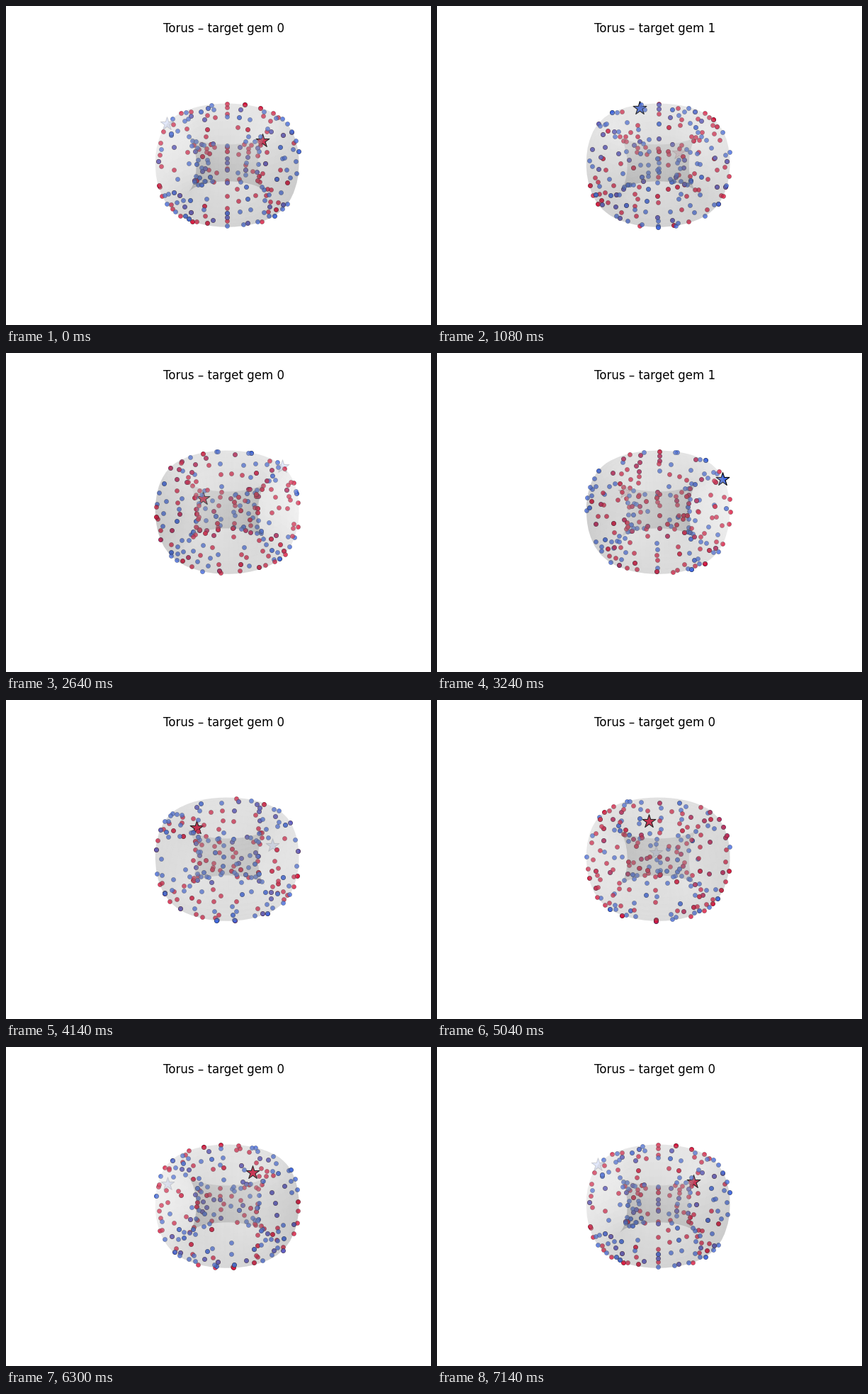
Animation of 600x450 px, one loop 7.2 s. Source, as a matplotlib script:

```python
import numpy as np
import matplotlib.pyplot as plt
from matplotlib.animation import FuncAnimation

FRAMES = 120
LATTICE = 20
MAJOR, MINOR = 1.0, 0.4
COLORS = ("crimson", "royalblue")
GEMS = ((5, 8), (14, 3))  # lattice cells of the two stars


def torus(u, v):
    ring = MAJOR + MINOR * np.cos(v)
    return ring * np.cos(u), ring * np.sin(u), MINOR * np.sin(v)


def cell_xyz(i, j):
    step = 2 * np.pi / LATTICE
    return torus(np.asarray(i) * step, np.asarray(j) * step)


fig = plt.figure(figsize=(6, 4.5), dpi=100)
ax = fig.add_subplot(projection="3d")
ax.set_axis_off()
ax.set_box_aspect((1, 1, 0.6))

u, v = np.meshgrid(np.linspace(0, 2 * np.pi, 49), np.linspace(0, 2 * np.pi, 33))
ax.plot_surface(*torus(u, v), color="lightgray", alpha=0.15, rstride=1,
                cstride=1, linewidth=0, antialiased=True)

# Cells are drawn with replacement, so some dots overlap.
rng = np.random.default_rng(7)
for color in COLORS:
    i, j = rng.integers(0, LATTICE, (2, 150))
    ax.scatter(*cell_xyz(i, j), s=20, c=color, alpha=0.8, edgecolors="black",
               linewidths=0.2, depthshade=False)

stars = [
    ax.scatter(*cell_xyz([i], [j]), s=200, marker="*", c=color,
               edgecolors="black", linewidths=0.8, depthshade=False)
    for (i, j), color in zip(GEMS, COLORS)
]
title = ax.set_title("", fontsize=12, y=1.0, pad=12)
title.set_y(1.0)  # 3D axes lower the title on their own


def update(frame):
    azim = 360 * frame / (FRAMES - 1)
    target = int(azim // 30) % 2
    ax.view_init(elev=25, azim=azim)
    for k, star in enumerate(stars):
        star.set_alpha(1.0 if k == target else 0.15)
    title.set_text(f"Torus – target gem {target}")
    return [title, *stars]


anim = FuncAnimation(fig, update, frames=FRAMES, interval=60,
                     repeat=True, repeat_delay=0, blit=False)
plt.show()
```
